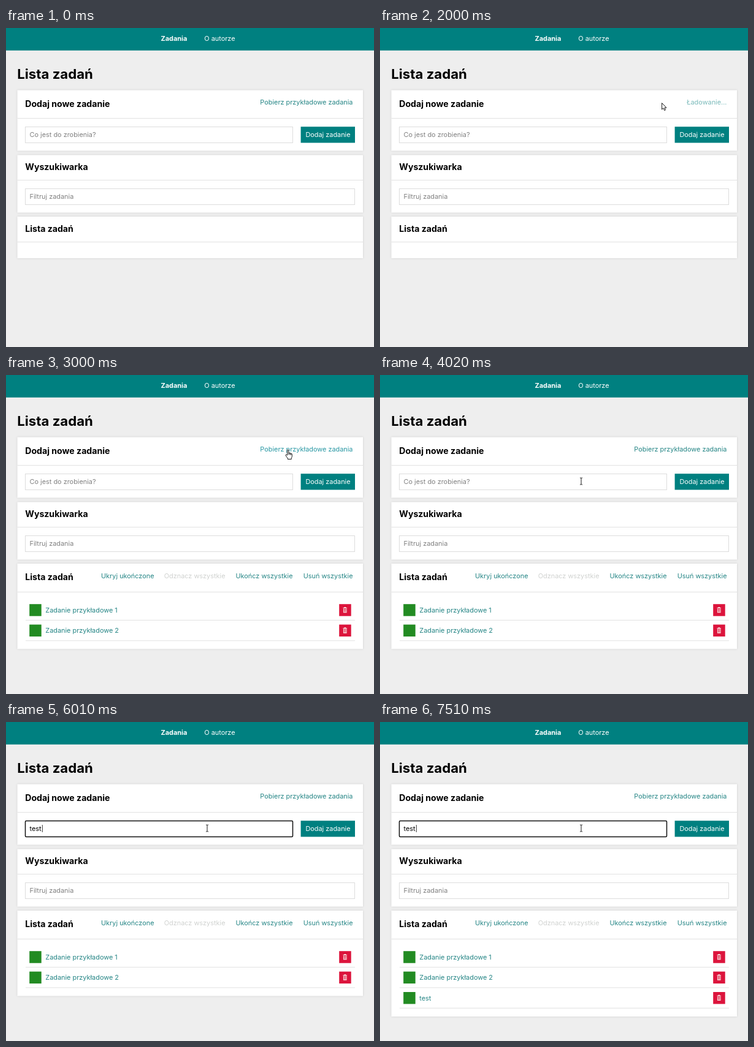
An HTML page that plays this animation: 600x521 px, repeating every 8 s.

```html
<!DOCTYPE html>
<html lang="pl">
<head>
<meta charset="utf-8">
<title>Lista zadań</title>
<style>
  html, body { margin: 0; width: 100%; height: 100%; overflow: hidden; background: #eee; }
  svg { display: block; width: 600px; height: 521px; }
  text { font: 10.9px Inter, sans-serif; font-optical-sizing: none; white-space: pre; }
  .h1 { font-size: 22.2px; font-weight: 700; }
  .h2 { font-size: 14.1px; font-weight: 700; }
  .bold { font-weight: 700; }
  .end { text-anchor: end; }
  .link { fill: #268686; }
  .hint { fill: #808080; }
  .card { fill: #fff; filter: drop-shadow(0 0 1.5px #ccc); }
  .rule { fill: none; stroke: #e2e2e2; }
  .field { fill: #fff; stroke: #ddd; }
  .focus { fill: #fff; stroke: #101010; stroke-width: 1.5; }
  .pointer { fill: #fff; stroke: #000; stroke-linejoin: round; }
</style>
</head>
<body>
<svg viewBox="0 0 600 521">
  <rect width="600" height="521" fill="#eee"/>
  <rect width="600" height="36.7" fill="teal"/>
  <text class="bold" x="252.5" y="21" fill="#fff">Zadania</text>
  <text x="323.3" y="21" fill="#fff">O autorze</text>
  <text class="h1" x="18.3" y="83">Lista zadań</text>

  <rect class="card" x="18.5" y="101.5" width="563.5" height="99"/>
  <path class="rule" d="M18.5 147.5H582"/>
  <text class="h2" x="31.3" y="129">Dodaj nowe zadanie</text>
  <text class="end" id="fetch" x="565.5" y="124.5"></text>
  <rect id="input" x="31.5" y="161.5" width="436" height="26"/>
  <text id="value" x="38.5" y="178"></text>
  <path id="caret" stroke="#000" stroke-width=".8"/>
  <g id="button">
    <rect x="480.6" y="161.2" width="88.4" height="26.3"/>
    <text x="525" y="178" text-anchor="middle" fill="#fff">Dodaj zadanie</text>
  </g>

  <rect class="card" x="18.5" y="207.5" width="563.5" height="94"/>
  <path class="rule" d="M18.5 248.5H582"/>
  <text class="h2" x="31.3" y="232">Wyszukiwarka</text>
  <rect class="field" x="31.5" y="262.5" width="537" height="26"/>
  <text class="hint" x="38.5" y="279">Filtruj zadania</text>

  <rect class="card" id="list" x="18.5" y="308" width="563.5"/>
  <path class="rule" id="listRule"/>
  <text class="h2" id="listTitle" x="31.3">Lista zadań</text>
  <g id="actions">
    <text class="end link" x="241.5" y="331.5">Ukryj ukończone</text>
    <text class="end" x="357.5" y="331.5" fill="#d0d2d0">Odznacz wszystkie</text>
    <text class="end link" x="467.5" y="331.5">Ukończ wszystkie</text>
    <text class="end link" x="565.5" y="331.5">Usuń wszystkie</text>
  </g>
  <g id="tasks"></g>

  <g class="pointer">
    <path id="arrow" stroke-width=".9" d="M0 .5V11L2.4 8.8 4.1 12.6 5.9 11.8 4.3 8.2H7.4Z"/>
    <path id="hand" stroke-width=".9" d="M-.9 9V1.2Q-.9 0 .2 0T1.3 1.2V5.3Q2.4 4.5 3.3 5.7 4.4 5.1 5.1 6.3 6.7 5.8 6.8 7.5V10.5Q6.8 12 5.7 13.5V15.5H-.3V14L-3.6 9.6Q-4 8.2-2.8 8Q-1.9 8-.9 9.4M1.3 5.3V8.3M3.3 5.7V8.5M5.1 6.3V8.8"/>
    <path id="beam" fill="none" stroke-width=".9" d="M-2-5.5H-.5L0-5 .5-5.5H2M0-5V5M-2 5.5H-.5L0 5 .5 5.5H2"/>
  </g>
</svg>
<script>
const $ = id => document.getElementById(id);
const LOOP = 8000;
const PLACEHOLDER = 'Co jest do zrobienia?';
const TASKS = ['Zadanie przykładowe 1', 'Zadanie przykładowe 2', 'test'];
const LINK = '#268686';
const base = { pointer: '', x: 0, y: 0, link: LINK, loading: false, hover: false,
               tasks: 0, focus: false, value: '', caret: 0 };

// Each step changes only the listed properties of the step before it.
const steps = [
  [0, {}],
  [500, { pointer: 'hand', x: 478.5, y: 169, hover: true }],
  [1000, { x: 459.6, y: 122, hover: false, link: '#1aa0a0' }],
  [2000, { pointer: 'arrow', loading: true, link: '#7ababa' }],
  [2500, { link: '#ccc' }],
  [3000, { pointer: 'hand', loading: false, link: '#2a98a4', tasks: 2 }],
  [3510, { pointer: 'arrow', x: 393.5, y: 148, link: LINK }],
  [4020, { pointer: 'beam', x: 328, y: 173.5 }],
  [4510, { focus: true, caret: 39 }],
  [5010, { caret: 0 }],
  [5510, { value: 'te', caret: 49 }],
  [6010, { value: 'test', caret: 59 }],
  [6510, { value: '', caret: 0, tasks: 3 }],
  [7010, { caret: 39 }],
  [7510, { value: 'test', caret: 59 }],
];
let state = base;
const timeline = steps.map(([start, change]) => ({ start, state: state = { ...state, ...change } }));

function set(id, attributes) {
  for (const name in attributes) $(id).setAttribute(name, attributes[name]);
}

function show(id, visible) {
  set(id, { visibility: visible ? 'visible' : 'hidden' });
}

$('tasks').innerHTML = TASKS.map((name, i) => `
  <g id="task${i}" transform="translate(0 ${374.2 + i * 33.4})">
    <rect x="38.2" width="19.5" height="19.5" fill="forestgreen"/>
    <text class="link" x="64.3" y="13.6">${name}</text>
    <rect x="543.2" width="19.5" height="19.5" fill="crimson"/>
    <path d="M549.5 6.3h6.5M551.5 5.3h2.5M550.5 7.5v6h4.5v-6M552.8 7.5v6"
      fill="none" stroke="#fbefec" stroke-width="1.1"/>
    <path class="rule" d="M32 26.3H569"/>
  </g>`).join('');

function render(s) {
  $('fetch').textContent = s.loading ? 'Ładowanie...' : 'Pobierz przykładowe zadania';
  set('fetch', { fill: s.link });
  set('button', {
    fill: s.hover ? '#009090' : 'teal',
    transform: s.hover ? 'translate(525 174) scale(1.05) translate(-525 -174)' : '',
  });

  set('input', { class: s.focus ? 'focus' : 'field', rx: s.focus ? 1.5 : 0 });
  $('value').textContent = s.value || PLACEHOLDER;
  set('value', { class: s.value ? '' : 'hint' });
  set('caret', { d: `M${s.caret + .3} 168V180` });
  show('caret', s.caret);

  const filled = s.tasks > 0;
  set('list', { height: filled ? 72.5 + s.tasks * 33.5 : 68 });
  set('listRule', { d: `M18.5 ${filled ? 354.5 : 349.5}H582` });
  set('listTitle', { y: filled ? 335 : 333 });
  show('actions', filled);
  TASKS.forEach((_, i) => show('task' + i, i < s.tasks));

  for (const id of ['arrow', 'hand', 'beam']) {
    show(id, id === s.pointer);
    set(id, { transform: `translate(${s.x} ${s.y})` });
  }
}

let current;
function tick() {
  const time = performance.now() % LOOP;
  const step = timeline.findLast(({ start }) => start <= time);
  if (step !== current) render((current = step).state);
  requestAnimationFrame(tick);
}
tick();
</script>
</body>
</html>
```
